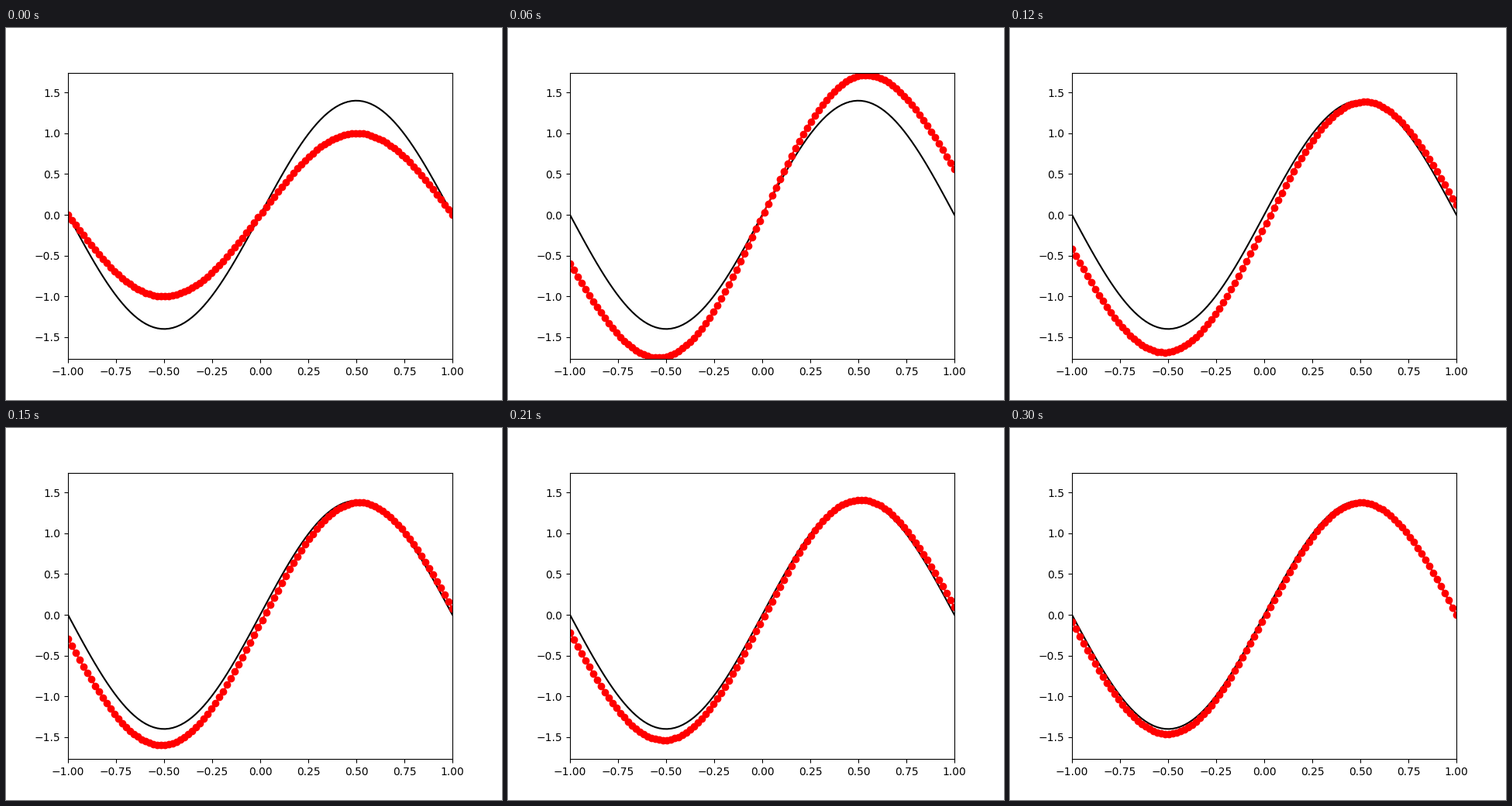
Recreate the animation shown at these times as a matplotlib script. Size 640 px wide and 480 px high, loop 0.33 s.

```python
import numpy as np
import matplotlib.pyplot as plt
from matplotlib.animation import FuncAnimation

FRAMES = 11
INTERVAL = 30  # ms

x = np.linspace(-1, 1, 100)


def swing(t, size, keep, speed):
    """Damped swing that starts at -size and dies out."""
    return -size * keep**t * np.cos(speed * t)


def estimate(t):
    # The fit overshoots, then its amplitude, tilt and shift settle.
    amp = 1.395 + swing(t, 0.395, 0.40, 1.08)
    tilt = (0.75 - 0.053 * t)**2 + swing(t, 0.5625, 0.61, 1.24)
    shift = np.interp(t, [0, 1, 2, 4, 6, 10], [0, 0.047, -0.02, -0.15, -0.07, -0.042])
    return amp * np.sin(np.pi * x) + tilt * x + shift


fig, ax = plt.subplots(figsize=(6.4, 4.8), dpi=100)
ax.set_xlim(-1, 1)
ax.set_ylim(-1.769, 1.7435)
ax.plot(x, 1.4 * np.sin(np.pi * x), "k-")
dots, = ax.plot(x, estimate(0), "ro-")


def update(t):
    dots.set_ydata(estimate(t))
    return dots,


anim = FuncAnimation(fig, update, frames=FRAMES, interval=INTERVAL, repeat=True)
plt.show()
```
